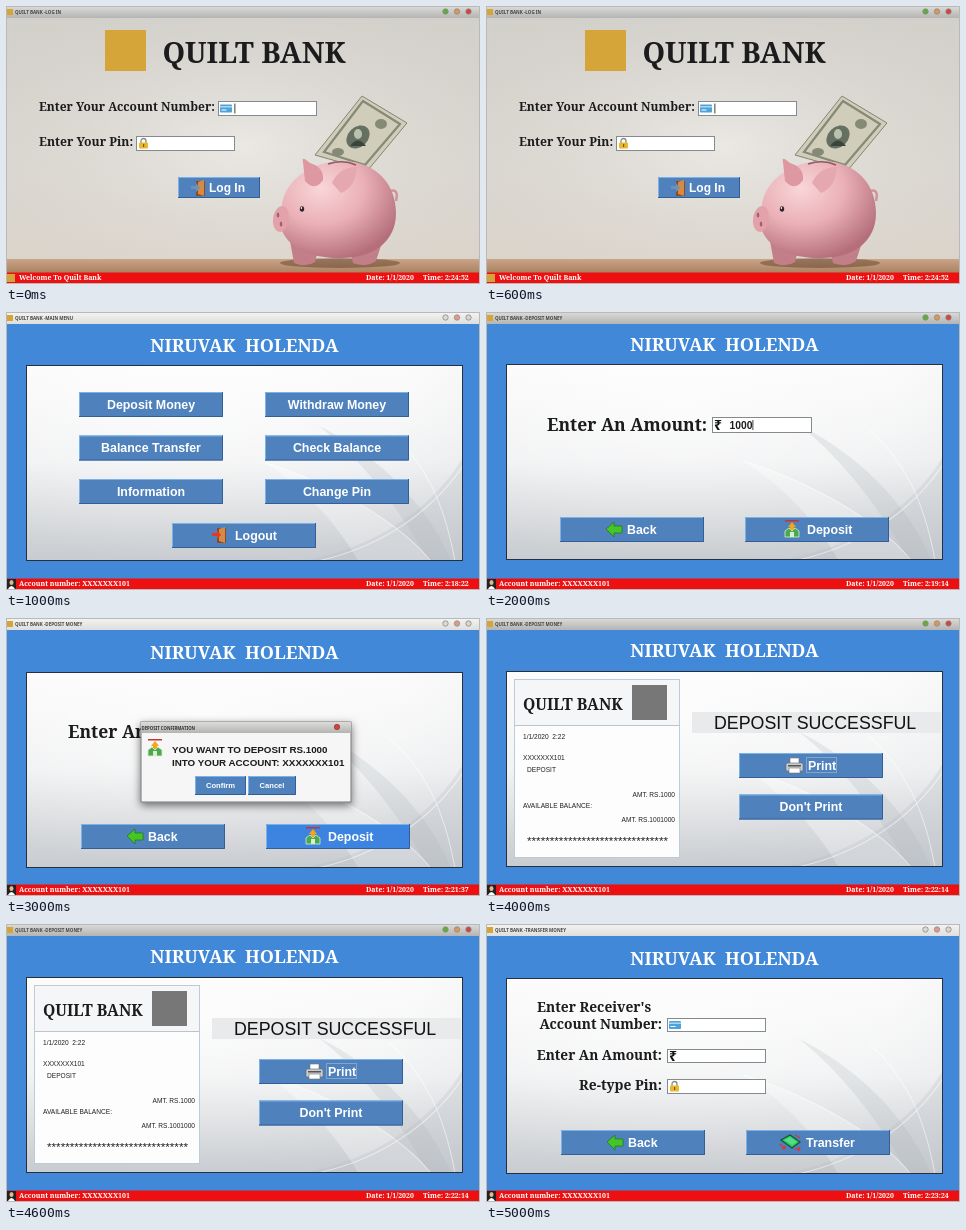
These frames come from a looping animation (474x278 px, 6 s). An HTML page:

```html
<!DOCTYPE html>
<html lang="en">
<head>
<meta charset="utf-8">
<title>Bank terminal</title>
<style>
  html, body { margin: 0; width: 100%; height: 100%; overflow: hidden; }
  svg { display: block; width: 474px; height: 278px; }
  text { white-space: pre; }
  .slab { font-family: "Noto Serif", serif; font-weight: 700; }
  .sans { font-family: "Liberation Sans", Arial, sans-serif; }
  .bold { font-weight: 700; }
  .bar { font-family: "Noto Sans", sans-serif; font-weight: 600; }
  .scene { visibility: hidden; animation: show 6s step-end infinite; }
  @keyframes show {
    0% { visibility: visible; }
    16.6667%, 100% { visibility: hidden; }
  }
</style>
</head>
<body>
<svg id="stage" viewBox="0 0 474 278" xmlns="http://www.w3.org/2000/svg"></svg>
<script>
const BANK = 'QUILT BANK', CLIENT = 'NIRUVAK  HOLENDA';
const INK = '#1c1c1e', BLUE = '#4188d8', BUTTON = '#4f81bd', RED = '#ee1010', GOLD = '#d6a53a';

const rect = (x, y, w, h, fill, extra = '') =>
  `<rect x="${x}" y="${y}" width="${w}" height="${h}" fill="${fill}" ${extra}/>`;
const path = (d, fill, extra = '') => `<path d="${d}" fill="${fill}" ${extra}/>`;
const oval = (x, y, rx, ry, fill, extra = '') =>
  `<ellipse cx="${x}" cy="${y}" rx="${rx}" ry="${ry}" fill="${fill}" ${extra}/>`;
const text = (str, x, y, size, kind = 'slab', fill = INK, anchor = 'start') =>
  `<text x="${x}" y="${y}" font-size="${size}" class="${kind}" fill="${fill}" text-anchor="${anchor}">${str}</text>`;
const at = (x, y, body) => `<g transform="translate(${x} ${y})">${body}</g>`;

const door = arrow => rect(5, 1, 9, 15, '#8d4a22') + path('M7 2L13 0V16L7 14Z', '#d58a45') +
  path('M0 6H5V3L9 8L5 12V9H0Z', arrow);

const icons = {
  login: door('#6b93b8'),
  logout: door('#e23a24'),
  back: path('M0 7L8 0V4H16V11H8V15Z', '#45c527', 'stroke="#237c16" stroke-width=".8"'),
  deposit: rect(1, 0, 14, 1.5, '#c33') + path('M8 2L12 7H10V10H6V7H4Z', '#f2a51d') +
    path('M1 17V11L5 8L8 11L11 8L15 11V17Z', '#4aa850', 'stroke="#dcecc8" stroke-width=".8"') +
    rect(6, 12, 4, 5, '#d9f0c8'),
  transfer: path('M1 6L10 1L20 8L12 14Z', '#2fc566', 'stroke="#14562c" stroke-width="1.2"') +
    path('M4 6L10 3L17 8L12 11Z', '#54dd86') +
    path('M0 10L5 15M5 15V12M5 15H2M15 1L20 4M14 15H20M18 13L20 15L18 17', 'none', 'stroke="#e03030" stroke-width="1.2"'),
  printer: rect(4, 0, 9, 6, '#fff', 'stroke="#777" stroke-width=".6"') +
    rect(0, 5, 17, 8, '#c9ccd0', 'rx="1.5" stroke="#666" stroke-width=".6"') +
    rect(3, 10, 11, 5, '#fff', 'stroke="#777" stroke-width=".6"') + rect(2, 7, 13, 1.5, '#555'),
  card: rect(0, 0, 12, 8, '#4fa3dc', 'rx="1"') + rect(0, 1.5, 12, 1.5, '#a9d8f4') + rect(1.5, 5, 5, 1, '#fff'),
  lock: path('M2 5V3A2.5 2.5 0 0 1 7 3V5', 'none', 'stroke="#8a8a8a" stroke-width="1.3"') +
    rect(0, 4.5, 9, 6, '#e9b82c', 'rx="1"') + rect(4, 6, 1.2, 3, '#7b5a10'),
  rupee: text('₹', 0, 11, 14, 'bar bold', '#111'),
  user: rect(0, 0, 9, 10, '#222') + oval(4.5, 3.5, 2, 2.6, '#e8b48c') + path('M1 10Q4.5 4 8 10Z', '#fff')
};

function button(x, y, w, h, label, labelX, icon, iconX, iconY, fill = BUTTON, size = 12.4) {
  return rect(x, y, w, h, fill) +
    path(`M${x + .5} ${y + h}V${y + .5}H${x + w}`, 'none', 'stroke="#78b4ea"') +
    path(`M${x} ${y + h - .5}H${x + w - .5}V${y}`, 'none', 'stroke="#345f96"') +
    (icon ? at(iconX, iconY, icons[icon]) : '') +
    text(label, labelX, y + h / 2 + size * .36, size, 'sans bold', '#fff', icon ? 'start' : 'middle');
}

const field = (x, y, w, h, icon, dx, dy) =>
  rect(x + .5, y + .5, w - 1, h - 1, '#fff', 'stroke="#858a90"') + at(x + dx, y + dy, icons[icon]);
const caret = (x, y) => rect(x, y, .8, 10, '#111');

function titleBar(name, active) {
  const lights = active ? ['#5fae3c', '#dd9558', '#d2443f'] : ['#ddd9d0', '#e29a86', '#dcd3cf'];
  return rect(0, 0, 474, 12, active ? 'url(#barOn)' : 'url(#barOff)') +
    rect(1, 3, 6, 6, GOLD) + text(`${BANK} -${name}`, 9, 7.9, 4.5, 'bar', '#444') +
    lights.map((c, i) => oval(439.5 + 11.5 * i, 5.5, 2.7, 2.7, c, 'stroke="#8b8b85" stroke-width=".8"')).join('');
}

function statusBar(label, time, icon) {
  const line = (str, x) => text(str, x, 273.8, 7, 'slab', '#fff');
  return rect(0, 266.5, 474, 11.5, RED) + icon +
    line(label, 13) + line('Date: 1/1/2020', 360) + line(`Time: ${time}`, 417);
}

// Blue window shared by every screen after login
function windowed(title, time, active, y, headY, body) {
  const swoosh = path('M235 96C310 120 372 158 402 195H330C310 160 280 125 235 96Z', '#fff', 'opacity=".3"') +
    path('M290 60C350 90 400 140 422 195H400C372 145 335 95 290 60Z', '#a9b0b8', 'opacity=".22"') +
    path('M275 195C345 182 402 145 434 92V195Z', '#b2b8be', 'opacity=".25"') +
    path('M360 65C395 95 415 135 426 195M235 96C310 120 372 158 402 195M290 195C350 182 402 148 434 100',
      'none', 'stroke="#fff" opacity=".55"');
  return rect(0, 0, 474, 278, BLUE) + titleBar(title, active) +
    text(CLIENT, 238.5, headY, 18, 'slab', '#fff', 'middle') +
    `<svg x="20" y="${y}" width="437" height="196" viewBox="0 0 434 195" preserveAspectRatio="none">` +
    rect(0, 0, 434, 195, 'url(#panel)') + rect(0, 0, 434, 195, 'url(#sheen)') + swoosh + '</svg>' +
    rect(20.5, y + .5, 436, 195, 'none', 'stroke="#26303c"') + body +
    statusBar('Account number: XXXXXXX101', time, at(1, 267, icons.user));
}

function piggy() {
  const leaf = '#858a76';
  return path('M356 90L401 117L362 164L309 149Z', '#d0cdba', 'stroke="#858370" stroke-width="1"') +
    path('M357 95L394 118L359 159L318 146Z', 'none', `stroke="${leaf}" stroke-width="2.2"`) +
    oval(352, 131, 13, 10, '#657062', 'transform="rotate(-45 352 131)"') +
    oval(352, 128, 4, 5, '#bcc0ae') + path('M344 140Q352 129 360 140Z', '#3a443a') +
    oval(375, 118, 6, 5, leaf) + oval(332, 146, 6, 4, leaf) +
    oval(334, 257, 60, 5, '#4b2c1d', 'opacity=".4"') +
    path('M284 235L288 257Q300 262 309 256L313 240ZM343 240L347 257Q360 262 370 255L378 230Z', '#c27f88') +
    path('M384 185Q393 182 390 195', 'none', 'stroke="#d2919b" stroke-width="2.5"') +
    path('M276 198C280 174 305 155 338 155C370 156 390 178 390 207C390 236 367 252 336 252C305 253 281 241 275 222Z', 'url(#pink)') +
    path('M297 156Q295 149 304 157Q318 161 317 174Q309 186 299 175Z', '#dd98a2') +
    path('M326 177Q333 161 351 161Q350 181 335 187Z', '#e5a8b0') +
    oval(275, 213, 8, 13, '#e3a2aa', 'transform="rotate(8 275 213)"') +
    oval(272, 209, 1.3, 2.6, '#a45f6c') + oval(275, 218, 1.3, 2.6, '#a45f6c') +
    oval(296, 203, 2.2, 2.8, '#35252a') + oval(295.4, 202, .7, .9, '#fff') +
    path('M322 158Q337 153 350 159', 'none', 'stroke="#8d5a62" stroke-width="1.6"');
}

const login = rect(0, 12, 474, 255, 'url(#wall)') + rect(0, 12, 474, 255, 'url(#glow)') +
  rect(0, 253, 474, 14, 'url(#wood)') + piggy() + titleBar('LOG IN', true) +
  rect(99, 24, 41, 41, GOLD) + text(BANK, 248, 57, 28.8, 'slab', INK, 'middle') +
  text('Enter Your Account Number:', 33, 105, 12) + field(212, 95, 99, 15, 'card', 2, 3.5) + caret(228.5, 97.5) +
  text('Enter Your Pin:', 33, 140, 12.2) + field(130, 130, 99, 15, 'lock', 3, 2) +
  button(172, 171, 82, 21, 'Log In', 203, 'login', 185, 174, BUTTON, 12) +
  statusBar('Welcome To Quilt Bank', '2:24:52', rect(1, 268, 8, 8, GOLD));

const choices = [['Deposit Money', 'Withdraw Money'], ['Balance Transfer', 'Check Balance'], ['Information', 'Change Pin']];
const menu = choices.map((row, r) => row.map((label, c) =>
  button(73 + 186 * c, 80 + 43.5 * r, 144, 25, label, 145 + 186 * c)).join('')).join('') +
  button(166, 211, 144, 25, 'Logout', 229, 'logout', 206, 215);

const deposit = text('Enter An Amount:', 61, 119, 17.5) + field(226, 105, 100, 16, 'rupee', 2, 2) +
  text('1000', 243.5, 116.8, 10.3, 'sans bold') + caret(266.5, 108) +
  button(74, 205, 144, 25, 'Back', 141, 'back', 120, 210) +
  button(259, 205, 144, 25, 'Deposit', 321, 'deposit', 298, 208);

const confirm = text('Enter An Amount:', 62, 120, 17.5) +
  button(75, 206, 144, 25, 'Back', 142, 'back', 121, 211) +
  button(260, 206, 144, 25, 'Deposit', 322, 'deposit', 299, 209, '#3c84df') +
  rect(135, 104, 210, 80, '#f6f6f6', 'stroke="#777" filter="url(#shadow)"') +
  rect(135, 104, 210, 11, 'url(#barOn)') + text('DEPOSIT CONFIRMATION', 135.5, 111.5, 4.3, 'bar', '#333') +
  oval(331, 109, 2.7, 2.7, '#d9403c', 'stroke="#8a3a36" stroke-width=".7"') + at(141, 121, icons.deposit) +
  text('YOU WANT TO DEPOSIT RS.1000', 166, 135, 9.8, 'sans bold') +
  text('INTO YOUR ACCOUNT: XXXXXXX101', 166, 148, 9.8, 'sans bold') +
  button(189, 158, 51, 19, 'Confirm', 214.5, '', 0, 0, BUTTON, 7.6) +
  button(242, 158, 48, 19, 'Cancel', 266, '', 0, 0, BUTTON, 7.6);

const slip = (str, x, y, anchor) => text(str, x, y, 6.6, 'sans', '#222', anchor);
const receipt = rect(28.5, 61.5, 165, 178, '#fdfdfd', 'stroke="#bccbd6"') +
  rect(29, 62, 164, 45, '#f5f6f7') + rect(29, 107, 164, 1, '#b9c4cc') +
  text(BANK, 37, 91.5, 15.7) + rect(146, 67, 35, 35, '#777') +
  slip('1/1/2020  2:22', 37, 121) + slip('XXXXXXX101', 37, 142) + slip('DEPOSIT', 41, 154) +
  slip('AMT. RS.1000', 189, 179, 'end') + slip('AVAILABLE BALANCE:', 37, 190) +
  slip('AMT. RS.1001000', 189, 204, 'end') +
  text('*'.repeat(31), 111.5, 227, 11.7, 'sans', INK, 'middle') +
  rect(206, 94, 249, 21, '#e9eaeb') + text('DEPOSIT SUCCESSFUL', 228, 111, 17.8, 'sans', '#111') +
  button(253, 135, 144, 25, 'Print', 322, 'printer', 300, 140) +
  rect(320.5, 139.5, 30, 15, 'none', 'stroke="#dfe8f3" stroke-width=".7" stroke-dasharray="1 1"') +
  button(253, 176.5, 144, 25, "Don't Print", 325);

const transfer = text("Enter Receiver's", 51, 88, 13.8) + text('Account Number:', 176, 105, 13.8, 'slab', INK, 'end') +
  field(181, 94, 99, 14, 'card', 2, 3) +
  text('Enter An Amount:', 176, 136, 13.7, 'slab', INK, 'end') + field(181, 125, 99, 14, 'rupee', 2, 1) +
  text('Re-type Pin:', 176, 166, 13.8, 'slab', INK, 'end') + field(181, 155, 99, 15, 'lock', 3, 2) +
  button(75, 206, 144, 25, 'Back', 142, 'back', 121, 211) +
  button(260, 206, 144, 25, 'Transfer', 320, 'transfer', 294, 210);

const scenes = [
  login,
  windowed('MAIN MENU', '2:18:22', false, 53, 40, menu),
  windowed('DEPOSIT MONEY', '2:19:14', true, 52, 38.5, deposit),
  windowed('DEPOSIT MONEY', '2:21:37', false, 54, 40.5, confirm),
  windowed('DEPOSIT MONEY', '2:22:14', true, 53, 39, receipt),
  windowed('TRANSFER MONEY', '2:23:24', false, 54, 40.5, transfer)
];

const stops = list => list.map(([o, c, a = 1]) => `<stop offset="${o}" stop-color="${c}" stop-opacity="${a}"/>`).join('');
const linear = (id, x2, y2, list) => `<linearGradient id="${id}" x2="${x2}" y2="${y2}">${stops(list)}</linearGradient>`;
const radial = (id, cx, cy, r, list) => `<radialGradient id="${id}" cx="${cx}" cy="${cy}" r="${r}">${stops(list)}</radialGradient>`;

document.getElementById('stage').innerHTML = '<defs>' +
  linear('barOn', 0, 1, [[0, '#dcdcda'], [1, '#b4b4b2']]) +
  linear('barOff', 0, 1, [[0, '#f4f4f3'], [1, '#dededc']]) +
  linear('panel', 0, 1, [[0, '#fbfbfb'], [.5, '#f0f1f2'], [1, '#c9ccd0']]) +
  radial('sheen', .4, .2, .8, [[0, '#fff', .6], [.6, '#fff', .15], [1, '#c4c9ce', .15]]) +
  linear('wall', 0, 1, [[0, '#d6d4cf'], [.6, '#dfdcd6'], [1, '#e2d9cf']]) +
  radial('glow', .5, .5, .65, [[0, '#f0eeea', .7], [1, '#c8c4bc', .25]]) +
  linear('wood', 0, 1, [[0, '#c9a486'], [1, '#ab8161']]) +
  radial('pink', .35, .28, .75, [[0, '#f9d6d8'], [.5, '#eab0b7'], [1, '#b56f7b']]) +
  '<filter id="shadow" x="-10%" y="-15%" width="120%" height="140%"><feDropShadow dx="0" dy="3" stdDeviation="4" flood-opacity=".55"/></filter>' +
  '</defs>' +
  scenes.map((body, i) => `<g class="scene" style="animation-delay:${i - 6}s">${body}</g>`).join('') +
  rect(.5, .5, 473, 277, 'none', 'stroke="#b9b9b9"');
</script>
</body>
</html>
```
